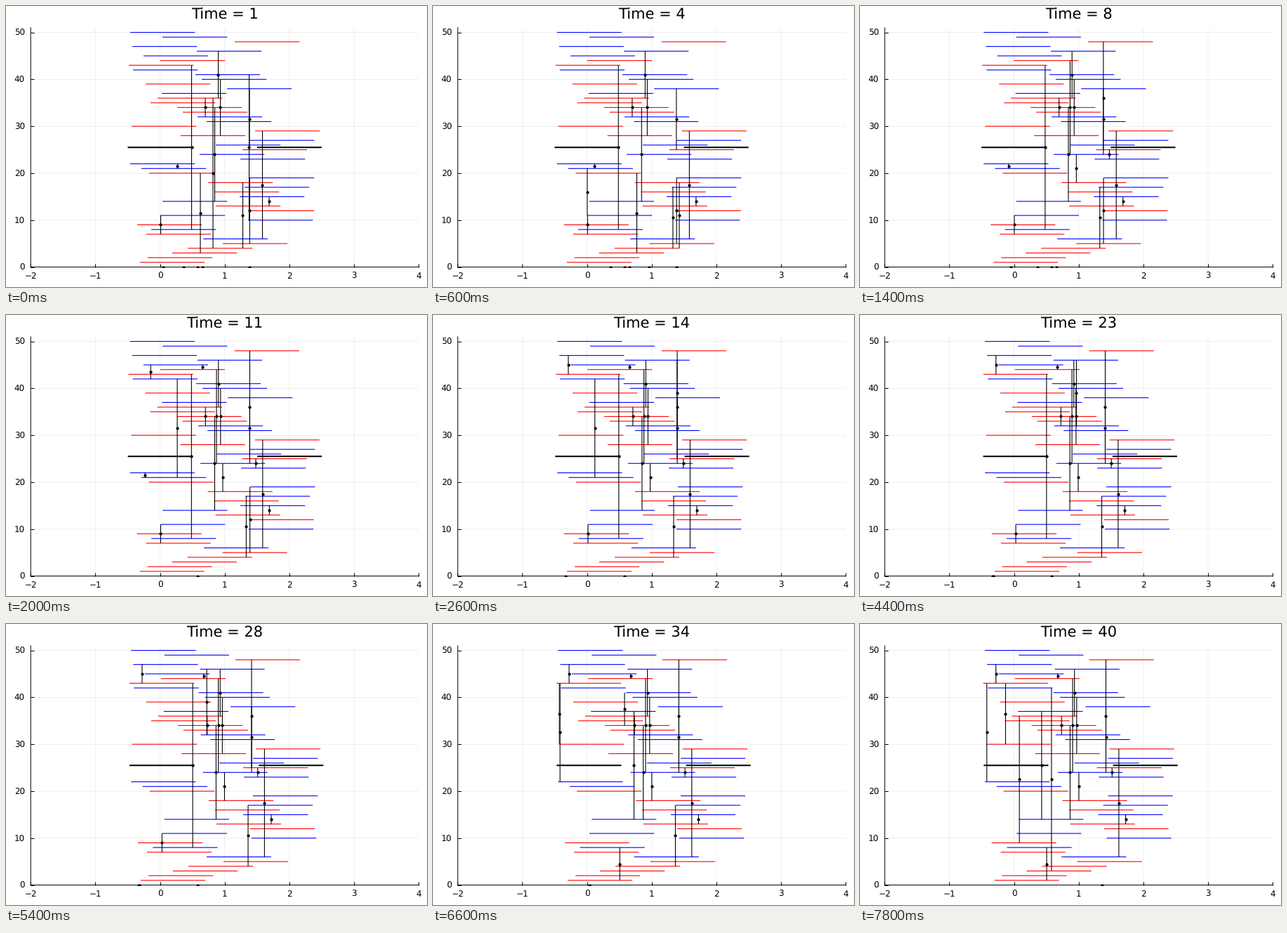
Recreate the animation shown at these times as a matplotlib script. Size 600 px wide and 400 px high, loop 8 s.

```python
import matplotlib.pyplot as plt
import numpy as np
from matplotlib.animation import FuncAnimation
from matplotlib.collections import LineCollection

W, H, DPI = 600, 400, 100
STEPS, STEP_MS = 40, 200
LEFT, RIGHT, TOP, BOTTOM = 35.2, 588.2, 30.9, 371.6   # plot area in pixels
UNIT = (RIGHT - LEFT) / 6                             # filament length
WALK = 0.05 * UNIT                                    # motor stride per step
SLACK = 0.5                                           # overhang before a motor slips off
PX = 72 / DPI

plt.rcParams["font.family"] = "DejaVu Sans"
plt.rcParams["text.hinting"] = "none"

# Left ends of the filaments in rows 1 to 50, in pixels
START = np.array([
    191, 202, 237, 259, 309, 281, 200, 207, 187, 345,
    220, 347, 299, 223, 333, 297, 340, 288, 347, 204,
    193, 177, 334, 276, 337, 299, 347, 249, 355, 179,
    286, 273, 252, 244, 206, 216, 222, 315, 199, 279,
    270, 181, 175, 220, 196, 272, 180, 326, 223, 177])
ROWS = np.arange(1, 51)
RED = {1, 2, 3, 4, 5, 7, 9, 12, 13, 16, 18, 20, 25, 28, 29, 30,
       33, 34, 35, 36, 39, 43, 44, 48}
IS_RED = np.array([r in RED for r in ROWS])

# Blue filaments slide more the further right they lie; red ones hardly move
SLIDE = np.where(IS_RED, 0.6, np.minimum(1 + 0.05 * (START - 177), 6.5))

# Each motor: first x, then its bindings as (step, lower row, upper row)
MOTORS = [
    (284, (1, 32, 36)),
    (302.5, (1, 36, 46)),
    (305.5, (1, 28, 40)),
    (297.5, (1, 14, 34)),
    (347, (1, 25, 38)),
    (365.5, (1, 6, 29)),
    (375, (1, 13, 15)),
    (264.5, (1, 8, 43), (32, 1, 8)),
    (295, (1, 4, 36), (5, 18, 24)),
    (277, (1, 3, 20), (7, 24, 44)),
    (337.5, (1, 4, 18), (6, 23, 25)),
    (346.5, (1, 10, 41), (4, 4, 17)),
    (220.5, (1, 7, 11), (39, 9, 36)),
    (244.5, (1, 21, 22), (30, 42, 47), (34, 30, 43)),
    (347.3, (1, 5, 19), (14, 32, 46), (31, 1, 20), (34, 14, 37)),
    (280, (11, 44, 45)),
    (347, (5, 24, 48)),
    (273, (34, 34, 41), (38, 3, 42)),
    (253, (9, 21, 42), (29, 42, 47), (32, 22, 43)),
    (224.5, (3, 11, 21), (9, 42, 45), (14, 43, 47)),
]


def to_x(px):
    return (px - LEFT) / UNIT - 2


def sway(t):
    """Shift in pixels shared by everything."""
    return np.interp(t, [1, 8, 20, 32], [0, -0.4, 1.8, 2.8])


def left_ends(t):
    return START + sway(t) + (SLIDE - sway(STEPS)) * (t - 1) / (STEPS - 1)


def track(x, *bindings):
    """(x, lower row, upper row) of one motor at every step.

    A motor rides on its two filaments, walks left on two blue ones and right
    on two red ones, and drops to the axis when it runs off either end.
    """
    due = {t: pair for t, *pair in bindings}
    pair, path = None, []
    ends = left_ends(1)
    for t in range(1, STEPS + 1):
        last, ends = ends, left_ends(t)
        if pair:
            held = np.array(pair) - 1
            x += np.mean(ends[held] - last[held])
            if IS_RED[held].all():
                x += WALK
            elif not IS_RED[held].any():
                x -= WALK
            gap = x - ends[held]
            if gap.min() < -SLACK or gap.max() > UNIT + SLACK:
                pair = None
        pair = due.get(t, pair)
        path.append((x, *(pair or (0, 0))))
    return path


TRACKS = np.array([track(*m) for m in MOTORS])


def bars(px, ys):
    return [[(a, y), (a + 1, y)] for a, y in zip(to_x(px), ys)]


fig = plt.figure(figsize=(W / DPI, H / DPI), dpi=DPI, facecolor="white")
ax = fig.add_axes([LEFT / W, 1 - BOTTOM / H, (RIGHT - LEFT) / W,
                   (BOTTOM - TOP) / H])
ax.set_xlim(-2, 4)
ax.set_ylim(0, 51)
ax.set_xticks(range(-2, 5))
ax.set_yticks(range(0, 51, 10))
ax.set_axisbelow(True)
ax.grid(color="black", alpha=0.1, lw=0.6 * PX)
ax.tick_params(direction="in", length=4.7 * PX, width=PX, labelsize=8.6)
ax.tick_params(axis="x", pad=6.8 * PX)
ax.tick_params(axis="y", pad=8.3 * PX)
for side in ("top", "right"):
    ax.spines[side].set_visible(False)
for side in ("left", "bottom"):
    ax.spines[side].set_linewidth(PX)

title = fig.text((LEFT + RIGHT) / 2 / W, 1 - 18.7 / H, "", size=15.1,
                 ha="center", va="baseline")


def add_lines(color, width, z):
    return ax.add_collection(
        LineCollection([], colors=color, lw=width * PX, zorder=z))


filaments = add_lines(np.where(IS_RED, "red", "blue"), 1.1, 2)
anchors = add_lines("black", 2, 3)
links = add_lines("black", 1.1, 4)
dots, = ax.plot([], [], "o", color="black", ms=4.2 * PX, mew=0, zorder=5)
for artist in fig.findobj():
    artist.set_snap(False)


def draw(i):
    t = i + 1
    title.set_text(f"Time = {t}")
    filaments.set_segments(bars(left_ends(t), ROWS))
    pads = LEFT + UNIT * np.array([1.5, 3.5]) + sway(t)
    anchors.set_segments(bars(pads, [25.5, 25.5]))
    x, lo, hi = TRACKS[:, i].T
    x = to_x(x)
    links.set_segments([[(a, b), (a, c)] for a, b, c in zip(x, lo, hi) if c])
    dots.set_data(x, (lo + hi) / 2)
    return title, filaments, anchors, links, dots


anim = FuncAnimation(fig, draw, frames=STEPS, interval=STEP_MS, repeat=True,
                     repeat_delay=0, init_func=lambda: draw(0))
plt.show()
```
